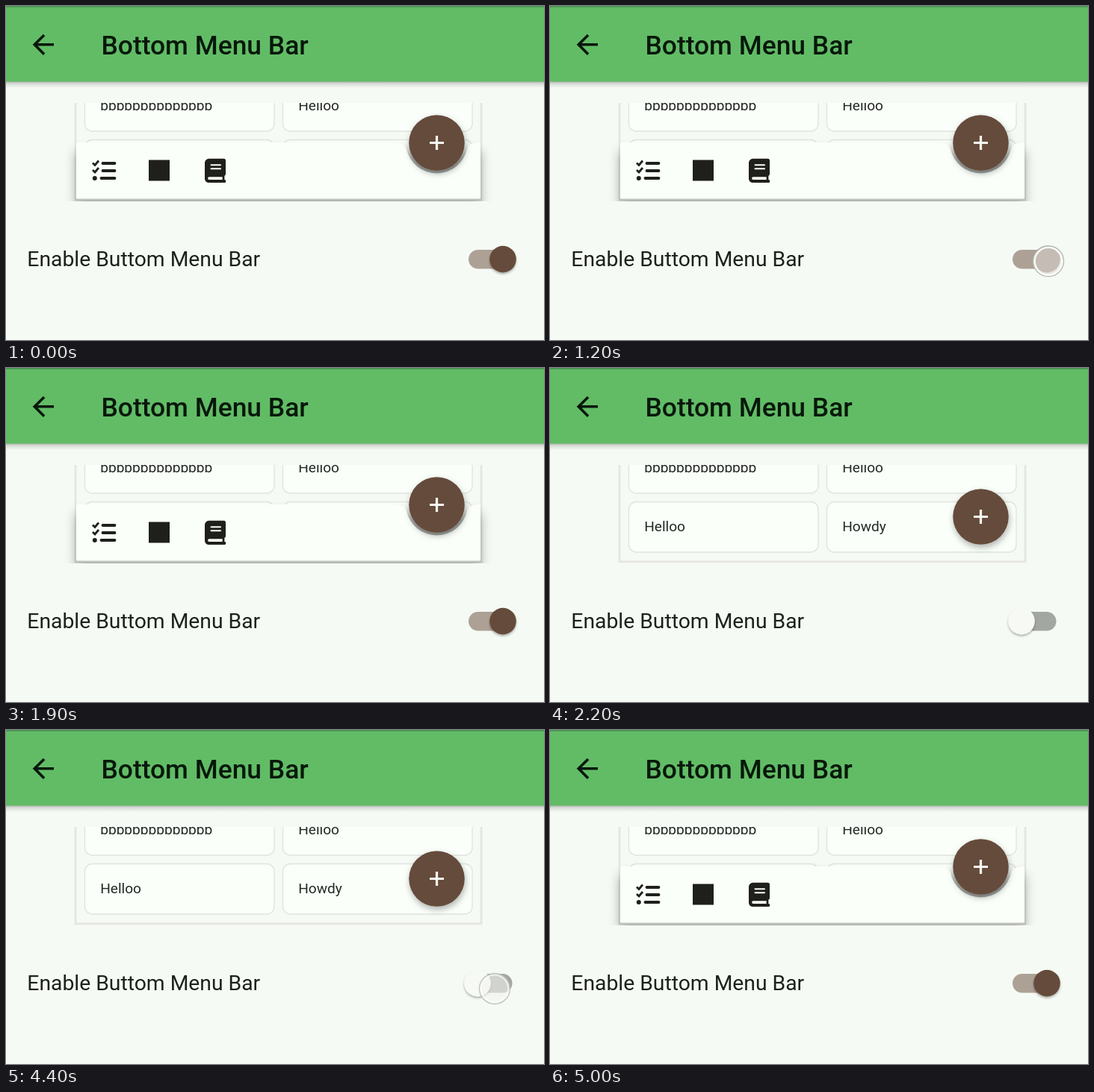
An HTML page that plays this animation: 720 px wide and 448 px high, repeating every 5.1 s.

```html
<!DOCTYPE html>
<html lang="en">
<head>
<meta charset="utf-8">
<title>Bottom Menu Bar</title>
<style>
  html, body { margin: 0; width: 100%; height: 100%; overflow: hidden; background: #f5faf4; }
  svg { display: block; width: 720px; height: 448px; }
  text { font-family: Roboto, sans-serif; fill: #1d211c; }
  .card { fill: #fafffa; stroke: #dfe4de; stroke-width: 1.3; }
  .note { font-size: 19.1px; fill: #252925; }
  .ink { fill: #1f1f1b; }
  .line { fill: none; stroke: #1f1f1b; }
</style>
</head>
<body>
<svg viewBox="0 0 720 448">
  <defs>
    <clipPath id="view"><rect x="66" y="130" width="595" height="132"/></clipPath>
    <filter id="soft" x="-20%" y="-60%" width="140%" height="220%"><feGaussianBlur stdDeviation="8"/></filter>
    <filter id="drop" x="-40%" y="-40%" width="180%" height="190%">
      <feDropShadow dx="1" dy="4" stdDeviation="4" flood-color="#000" flood-opacity=".3"/>
    </filter>
    <filter id="low" x="-40%" y="-40%" width="180%" height="190%">
      <feDropShadow dx="0" dy="2" stdDeviation="1.7" flood-color="#000" flood-opacity=".32"/>
    </filter>
    <linearGradient id="fade" x2="0" y2="1">
      <stop stop-color="#000" stop-opacity=".3"/>
      <stop offset=".35" stop-color="#000" stop-opacity=".12"/>
      <stop offset="1" stop-color="#000" stop-opacity="0"/>
    </linearGradient>
  </defs>

  <rect width="720" height="448" fill="#f5faf4"/>

  <!-- app bar -->
  <rect y="101" width="720" height="9" fill="url(#fade)"/>
  <rect width="720" height="101.5" fill="#62bc66"/>
  <rect width="720" height="1.6" fill="#469150"/>
  <path transform="translate(28.6 30.6) scale(1.77)" fill="#07180a"
    d="M20 11H7.83l5.59-5.59L12 4l-8 8 8 8 1.41-1.41L7.83 13H20z"/>
  <text x="127.4" y="65" font-size="35.4" font-weight="500" style="fill:#07180a">Bottom Menu Bar</text>

  <!-- preview -->
  <g clip-path="url(#view)">
    <path d="M93 120V259.8H636V120" fill="none" stroke="#e6e6e0" stroke-width="2.8"/>
    <g id="cards"></g>
    <g id="bar">
      <rect x="94" y="195" width="541" height="75" fill="#000" opacity=".34" filter="url(#soft)"/>
      <rect x="92" y="256" width="545" height="5" fill="#bfc1bb"/>
      <path id="sheet" fill="#fbfffa"/>
      <path class="line" stroke-width="2.8" d="M116 210.5l3 3 5-6M116 220l3 3 5-6"/>
      <circle class="ink" cx="118.8" cy="231" r="3"/>
      <path class="line" stroke-width="3.8" stroke-linecap="round" d="M129.5 211H145.5M129.5 221H145.5M127.5 231H145.5"/>
      <rect class="ink" x="191" y="206.5" width="28" height="28"/>
      <path class="ink" d="M271.5 204.8H291.5a2.5 2.5 0 0 1 2.5 2.5V225.5a2.5 2.5 0 0 1-1.6 2.3V233a2 2 0 0 1 0 4H271.5a5.5 5.5 0 0 1-5.5-5.5V210.3a5.5 5.5 0 0 1 5.5-5.5z"/>
      <path d="M272 229.2H289.6V233H272a1.9 1.9 0 0 1 0-3.8z" fill="#fbfffa"/>
      <path d="M274.5 213.3H287M274.5 218.2H287" stroke="#fbfffa" stroke-width="2" stroke-linecap="round"/>
    </g>
    <g id="fab">
      <circle r="37.3" fill="#654b3a" filter="url(#drop)"/>
      <path d="M-9.5 0H9.5M0-9.5V9.5" stroke="#f8fbf5" stroke-width="3.2"/>
    </g>
  </g>

  <!-- switch row -->
  <text x="28.3" y="349.4" font-size="28.3">Enable Buttom Menu Bar</text>
  <rect id="track" x="619" y="327" width="58.5" height="25.5" rx="12.75"/>
  <circle id="thumb" cy="339.6" r="17.8" filter="url(#low)"/>
  <g id="touch">
    <circle r="20" fill="#f3f3ef" fill-opacity=".68"/>
    <circle r="20.4" fill="none" stroke="#b9bdb7" stroke-width="1.6"/>
    <circle r="18.4" fill="none" stroke="#fafcf8" stroke-width="2.4"/>
  </g>
</svg>
<script>
const LOOP = 5100, STEP = 100, OFF = 2000, ON = 4800, MOVE = 200;
const FAB_X = 576.5, FAB_Y = { docked: 183.5, low: 222, floating: 199.5, above: 125.5 };
const $ = id => document.getElementById(id);
const set = (id, attrs) => {
  for (const k in attrs) $(id).setAttribute(k, attrs[k]);
};

const card = (x, y, label) =>
  `<rect class="card" x="${x + .5}" y="${y + .5}" width="253.5" height="67.5" rx="10"/>
   <text class="note" x="${x + 21.2}" y="${y + 40}">${label}</text>`;
$('cards').innerHTML = card(105, 100, 'b'.repeat(14)) + card(370, 100, 'Helloo') +
  card(105, 179, 'Helloo') + card(370, 179, 'Howdy');

// Bar outline with a round notch for a button of the given scale
function sheet(scale) {
  const r = 41.5 * scale, lip = 19 * scale, dip = 8.5 * scale;
  const side = Math.sqrt(r * r - dip * dip);
  const l = FAB_X - side, e = FAB_X + side, y = 183 + dip;
  const notch = scale > 0
    ? `H${l - lip}Q${l - 2 * scale} 183 ${l} ${y}A${r} ${r} 0 0 0 ${e} ${y}` +
      `Q${e + 2 * scale} 183 ${Math.min(635, e + lip)} 183` : '';
  return `M94 183${notch}H635V258.6H94Z`;
}

const mix = (a, b, k) => `rgb(${a.map((v, i) => Math.round(v + (b[i] - v) * k))})`;

// Each press: position and [start, opacity] steps
const presses = [
  { x: 667, y: 342.3, steps: [[1200, 1], [1600, .75], [1700, .42], [1800, .2], [1900, 0]] },
  { x: 654, y: 347, steps: [[4400, .85], [4500, 1], [4600, .8], [4700, .35], [4800, 0]] }
];

function draw(ms) {
  const t = Math.floor(ms % LOOP / STEP) * STEP;
  const barOn = t < OFF || t >= ON;
  const start = t >= ON ? ON : OFF;
  const p = Math.max(0, Math.min(1, (t - start) / MOVE));
  const e = 1 - (1 - p) ** 2.7;
  const scale = Math.abs(1 - 2 * e);
  const moved = e > .5;
  const { docked, low, floating, above } = FAB_Y;
  const y = t < OFF ? docked : t < ON ? (moved ? floating : low) : (moved ? docked : above);

  set('fab', { transform: `translate(${FAB_X} ${y}) scale(${scale})` });
  set('bar', { visibility: barOn ? 'visible' : 'hidden' });
  set('sheet', { d: sheet(y === docked ? scale : 0) });

  const slide = e ** .4;
  const k = start === ON ? slide : 1 - slide;
  set('track', { fill: mix([163, 167, 161], [173, 161, 149], k) });
  set('thumb', { cx: 631 + 34 * k, fill: mix([246, 249, 244], [101, 75, 58], k) });

  const press = presses[t < 3000 ? 0 : 1];
  const step = press.steps.filter(s => s[0] <= t).pop();
  set('touch', { transform: `translate(${press.x} ${press.y})`, opacity: step ? step[1] : 0 });
}

let origin;
function tick(now) {
  origin ??= now;
  draw(now - origin);
  requestAnimationFrame(tick);
}
draw(0);
requestAnimationFrame(tick);
</script>
</body>
</html>
```
